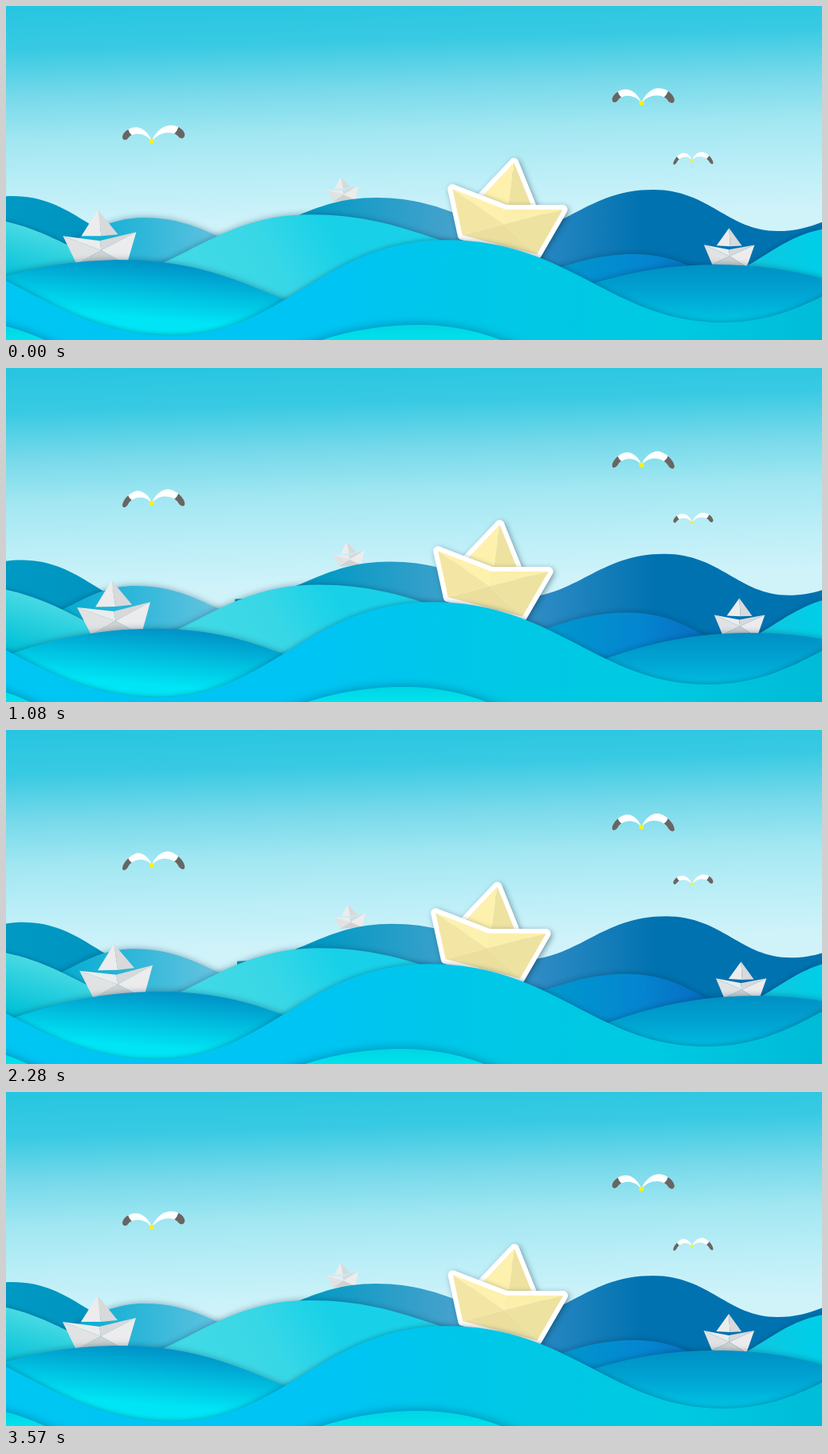
Recreate the animation shown at these times as an HTML page with a canvas. Size 1024x420 px, loop 3600 ms.

```html
<!DOCTYPE html>
<html lang="en">
<head>
<meta charset="utf-8">
<title>Paper boats</title>
<style>
  html, body { margin: 0; width: 100%; height: 100%; overflow: hidden; }
  canvas { display: block; }
</style>
</head>
<body>
<canvas id="stage" width="1024" height="420"></canvas>
<script>
const ctx = document.getElementById('stage').getContext('2d');
const FRAME = 30, HALF = 60;         // ms per step, steps per direction
const CREST = 0.45, TROUGH = 0.4;    // how far a wave stays level at its turning points
const SHADE = 'rgba(0,45,75,.42)';
const WHITE = { light: '#ececed', mid: '#e1e2e3', dark: '#d8d9da', belly: '#cfd2d1' };
const YELLOW = { light: '#fdf1ad', mid: '#f3e6a4', dark: '#eee2a0', belly: '#ecdf9e', side: '#fbefab' };
let p = 0;                           // swing position, 0..1

function gradient([x0, y0, x1, y1], colors) {
  const g = ctx.createLinearGradient(x0, y0, x1, y1);
  colors.forEach((c, i) => g.addColorStop(i / (colors.length - 1), c));
  return g;
}

function shadow(color = 'transparent', blur = 0, offset = 0) {
  Object.assign(ctx, { shadowColor: color, shadowBlur: blur, shadowOffsetX: offset, shadowOffsetY: offset });
}

// Draws in a frame that drifts by (dx, dy) over one swing.
function drift([dx, dy], draw) {
  ctx.save();
  ctx.translate(dx * p, dy * p);
  draw();
  ctx.restore();
}

// A swell through its crests and troughs, level at each of them.
function wave(move, turns, axis, colors, blur = 0) {
  drift(move, () => {
    ctx.beginPath();
    ctx.moveTo(turns[0][0], 500);
    ctx.lineTo(...turns[0]);
    for (let i = 1; i < turns.length; i++) {
      const [[x0, y0], [x1, y1]] = [turns[i - 1], turns[i]];
      const [from, to] = y1 < y0 ? [TROUGH, CREST] : [CREST, TROUGH];
      ctx.bezierCurveTo(x0 + (x1 - x0) * from, y0, x1 - (x1 - x0) * to, y1, x1, y1);
    }
    ctx.lineTo(turns.at(-1)[0], 500);
    if (blur) shadow(SHADE, blur);
    ctx.fillStyle = gradient(axis, colors);
    ctx.fill();
  });
}

function poly(color, ...points) {
  ctx.beginPath();
  points.forEach(pt => ctx.lineTo(...pt));
  ctx.closePath();
  ctx.fillStyle = color;
  ctx.fill();
}

// The folded boat, hung from the tip of its sail.
function boat(move, x, y, scale, angle, spin, paper, outlined) {
  drift(move, () => {
    ctx.translate(x, y);
    ctx.rotate(angle + spin * p);
    ctx.scale(scale, scale);
    const lift = outlined ? 4 : 0;
    const tip = [0, 0], base = [[-21, 33 + lift], [4, 33 + lift], [25, 31 + lift]];
    const bow = [-44, 33], dip = [2, 39], stern = [48, 28], fold = [4, 51], keel = [[-27, 68], [36, 69]];
    const border = (...points) => {
      if (!outlined) return;
      shadow('rgba(0,40,60,.4)', 7, 2);
      poly('#fff', ...points);
      Object.assign(ctx, { lineWidth: 12 / scale, lineJoin: 'round', strokeStyle: '#fff' });
      ctx.stroke();
      shadow();
    };
    border(tip, ...base);
    poly(paper.light, tip, base[0], base[1]);
    poly(paper.dark, tip, base[1], base[2]);
    border(bow, dip, stern, keel[1], keel[0]);
    poly(paper.mid, bow, fold, keel[0]);
    poly(paper.light, bow, dip, fold);
    poly(paper.side || paper.dark, dip, stern, fold);
    poly(paper.side ? paper.dark : paper.light, stern, fold, keel[1]);
    poly(paper.belly, fold, ...keel);
  });
}

// A wing bends more the further out it is; drop is how low its tip hangs.
function wing(scaleX, scaleY, drop) {
  const bend = ([x, y]) => [x, y + drop * (x / 37) ** 2];
  const curve = (...points) => ctx.bezierCurveTo(...points.flatMap(bend));
  ctx.save();
  ctx.scale(scaleX, scaleY);
  ctx.beginPath();
  ctx.moveTo(0, 0);
  curve([-3, -9], [-11, -17], [-19, -17.5]);
  curve([-28, -18], [-36, -12], [-37, -6]);
  curve([-37, 0], [-31, -1], [-29, -5]);
  curve([-24, -11], [-9, -12], [0, 0]);
  ctx.fillStyle = '#fff';
  ctx.fill();
  ctx.clip();
  poly('#666', ...[[-32, -20], [-28, -11], [-24, -6], [-24, 4], [-42, 4], [-42, -20]].map(bend));
  ctx.restore();
}

function bird(x, y, scale, left, right) {
  const mix = ([a, b]) => a + (b - a) * p;
  ctx.save();
  ctx.translate(x, y);
  wing(scale, scale, mix(left));
  wing(-scale * 1.12, scale * 1.1, mix(right));
  ctx.fillStyle = '#fdee1c';
  ctx.beginPath();
  ctx.arc(0, 0, 3 * scale, 0, 7);
  ctx.fill();
  ctx.restore();
}

function draw() {
  ctx.fillStyle = gradient([0, 0, 8, 285], ['#26c5e1', '#39cae3', '#76d9ea', '#a2e7f2', '#bbeef7', '#d0f3fa']);
  ctx.fillRect(0, 0, 1024, 420);

  bird(183, 170, 1, [0, 13], [-2, 11]);
  bird(797.5, 122, 1, [1, 9], [2, 10]);
  bird(861, 194, .64, [12, -2], [10, -3]);

  // Far swells
  boat([12.5, 6], 420, 215, .44, -.08, 0, WHITE);
  wave([28, 4], [[270, 288], [464, 241], [680, 290]], [370, 0, 560, 0], ['#0099c4', '#45a2cc']);
  wave([23, 4.5], [[628, 286], [812, 231], [968, 283], [1110, 250]], [630, 0, 800, 0], ['#358fc7', '#0072b0']);
  wave([18, 4], [[-160, 300], [8, 239], [180, 300]], [0, 0, 130, 0], ['#0099c4', '#0093c0']);

  // Middle swells
  wave([-18, 13], [[30, 308], [174, 266], [350, 312]], [80, 0, 270, 0], ['#04acd1', '#30b7d9', '#62c2df'], 8);
  wave([15, 17], [[100, 345], [382, 262], [660, 314]], [260, 350, 400, 270], ['#40d9e6', '#38d7e6', '#18d1e8'], 8);
  wave([-13, -7.5], [[610, 345], [790, 312], [970, 368]], [700, 0, 900, 0], ['#0096ce', '#0486d0', '#0868c0'], 8);
  wave([22, 14], [[865, 345], [1050, 278]], [930, 320, 1010, 300], ['#12c6de', '#00cee8'], 7);
  boat([21.5, 17], 907, 279, .69, .055, 0, WHITE);
  wave([70, 13], [[500, 405], [890, 325], [1280, 405]], [0, 328, 0, 400], ['#0091c5', '#00a6d4', '#00c6e4'], 8);

  // Near swells
  wave([8, 15], [[-60, 264], [230, 350]], [20, 275, 0, 345], ['#48dae4', '#00c0d6'], 6);
  boat([28.5, 18], 115, 256, 1, 0, -.03, WHITE);
  wave([70, 14], [[-255, 400], [145, 319], [505, 405]], [145, 320, 139, 390], ['#0094c8', '#00bedf', '#00e5f6'], 8);
  boat([-30, 0], 638, 197, 1.53, .239, 0, YELLOW, true);
  wave([-30, 0], [[-190, 294], [210, 414.5], [553, 294.3], [900, 398], [1240, 290]],
    [0, 330, 1054, 390], ['#00c6f4', '#00c5f4', '#00c4f3', '#00c8e6', '#00c9e2', '#00bad6'], 7);
  wave([-30, 0], [[-60, 395], [200, 470], [518, 401], [790, 470]], [0, 400, 0, 420], ['#00d4e4', '#00e2ec'], 13);
}

function tick(now) {
  const step = (Math.floor(now / FRAME) + 1) % (2 * HALF);
  p = 1 - Math.abs(1 - step / HALF);
  draw();
  requestAnimationFrame(tick);
}
tick(0);
</script>
</body>
</html>
```
